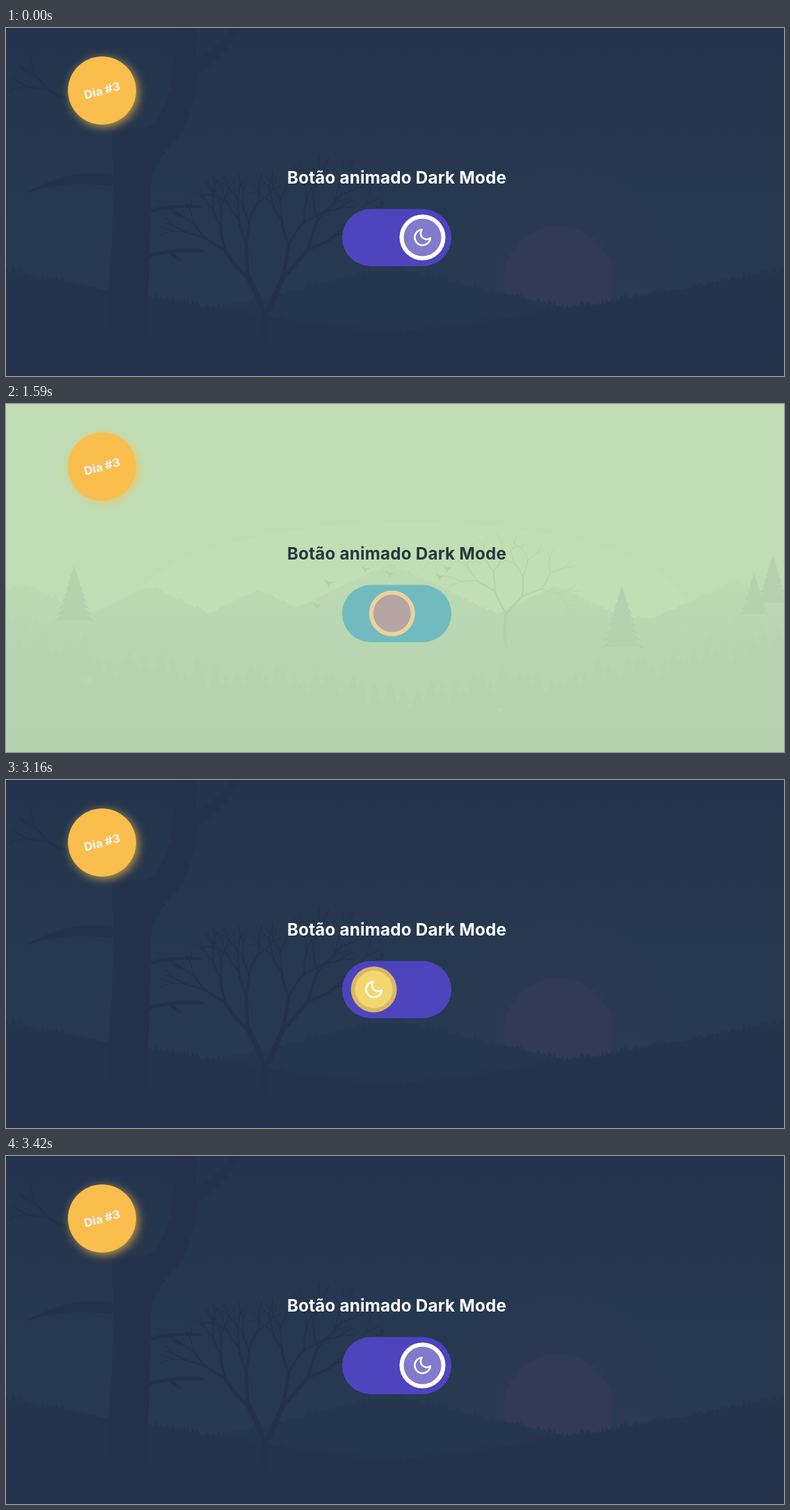
An HTML page that plays this animation: 1118 px wide and 501 px high, repeating every 4830 ms.

```html
<!DOCTYPE html>
<html lang="pt-BR">
<head>
<meta charset="utf-8">
<title>Botão animado Dark Mode</title>
<style>
html, body { margin: 0; width: 100%; height: 100%; overflow: hidden; }
svg { display: block; width: 100%; height: 100%; }
text { font-family: Inter, sans-serif; text-anchor: middle; }
</style>
</head>
<body>
<svg viewBox="0 0 1118 501" preserveAspectRatio="none">
  <defs>
    <linearGradient id="nightSky" x2="0" y2="1">
      <stop offset="0" stop-color="#24344e"/>
      <stop offset=".45" stop-color="#26384f"/>
      <stop offset=".8" stop-color="#273a51"/>
    </linearGradient>
    <linearGradient id="nightGround" x2="0" y2="1">
      <stop offset="0" stop-color="#24354e"/>
      <stop offset="1" stop-color="#24324c"/>
    </linearGradient>
    <radialGradient id="halo">
      <stop offset=".4" stop-color="#333b55" stop-opacity=".35"/>
      <stop offset="1" stop-color="#333b55" stop-opacity="0"/>
    </radialGradient>
    <linearGradient id="haze" x2="0" y2="1">
      <stop offset="0" stop-color="#bcdab3"/>
      <stop offset=".5" stop-color="#b8d6b2"/>
      <stop offset="1" stop-color="#b4d2ae"/>
    </linearGradient>
    <linearGradient id="woods" x2="0" y2="1">
      <stop offset="0" stop-color="#b6d5b0"/>
      <stop offset="1" stop-color="#b4d2ad"/>
    </linearGradient>
    <filter id="blur" x="-50%" y="-50%" width="200%" height="200%">
      <feGaussianBlur stdDeviation="7"/>
    </filter>
  </defs>

  <g id="night">
    <rect width="1118" height="501" fill="url(#nightSky)"/>
    <circle cx="794" cy="364" r="170" fill="url(#halo)"/>
    <circle cx="794" cy="364" r="79" fill="#323a54"/>
    <path id="backRidge" fill="#25364f"/>
    <path id="frontRidge" fill="url(#nightGround)"/>
    <path fill="#24314c" d="M133 501Q160 330 152 150L172 130Q188 152 206 141Q245 110 245 0H275L272 45Q305 28 322 0H338Q312 46 274 66Q270 120 251 155Q209 195 209 225Q206 400 198 501ZM154 211Q90 200 24 240Q80 217 154 228Z"/>
    <g id="branches" fill="none" stroke="#24314c" stroke-linecap="round"></g>
  </g>

  <g id="day">
    <rect width="1118" height="501" fill="#c0dcb4"/>
    <ellipse cx="580" cy="300" rx="400" ry="130" fill="#c2dfb6" opacity=".6"/>
    <path id="peaks" fill="url(#haze)"/>
    <path id="farWoods" fill="#b8d6b1"/>
    <path id="pines" fill="#b4d2ad"/>
    <path id="nearWoods" fill="url(#woods)"/>
    <g id="crown" fill="none" stroke="#b4d2ad" stroke-linecap="round"></g>
    <path id="birds" fill="#b3d1ad"/>
  </g>

  <circle id="glow" cx="141" cy="93" r="49" fill="#f9bd4c" filter="url(#blur)"/>
  <circle cx="138" cy="90" r="49" fill="#f9be4c"/>
  <text transform="translate(138 90) rotate(-15)" y="6" font-size="17" font-weight="800" fill="#f3f0f4">Dia #3</text>
  <text id="title" x="561.5" y="224" font-size="24.2" font-weight="700" letter-spacing=".2">Botão animado Dark Mode</text>

  <rect id="track" x="483" y="260.5" width="157" height="82.5" rx="41.25"/>
  <g id="knob">
    <circle id="rim" r="33"/>
    <circle id="face" r="27"/>
    <path id="moon" transform="scale(1.25) translate(-12 -12)" fill="none" stroke="#fff" stroke-width="2.1" stroke-linejoin="round" d="M21 12.79A9 9 0 1 1 11.21 3 7 7 0 0 0 21 12.79z"/>
  </g>
</svg>
<script>
const W = 1118, H = 501;
const $ = id => document.getElementById(id);
const set = (id, name, value) => $(id).setAttribute(name, value);

let seed = 7;
const rnd = () => (seed = seed * 16807 % 2147483647) / 2147483647;

// Ground below y = f(x), with random spikes along its edge.
function ridge(f, spike, step) {
  let d = `M0 ${H}`;
  for (let x = 0; x < W + step; x += step * (.5 + rnd())) {
    d += `L${x} ${f(x)}L${x + step / 3} ${f(x) - spike * rnd()}`;
  }
  return d + `V${H}Z`;
}

// Zigzag conifer widening downwards.
function pine(x, top, height) {
  const rows = 9;
  let right = '', left = '';
  for (let i = 1; i <= rows; i++) {
    const y = top + height * i / rows, w = height * .36 * i / rows;
    right += `L${x + w} ${y}L${x + w * .65} ${y - 2}`;
    left = `L${x - w * .65} ${y - 2}L${x - w} ${y}` + left;
  }
  return `M${x} ${top}${right}${left}Z`;
}

function forest(f, height) {
  let d = ridge(x => f(x) + height * .6, 8, 10);
  for (let x = 0; x < W; x += 8 + 14 * rnd()) {
    d += pine(x, f(x) - height * .4 * rnd(), height * (.8 + .4 * rnd()));
  }
  return d;
}

// Forking bare branches; spread is the fork angle in radians.
function grow(x, y, angle, length, width, spread, depth) {
  const bend = angle + (rnd() - .5) * .5;
  const cx = x + length / 2 * Math.cos(bend), cy = y + length / 2 * Math.sin(bend);
  const ex = x + length * Math.cos(angle), ey = y + length * Math.sin(angle);
  let out = `<path stroke-width="${width}" d="M${x} ${y}Q${cx} ${cy} ${ex} ${ey}"/>`;
  if (depth) for (const side of [-1, 1]) {
    out += grow(ex, ey, angle + side * spread * (.5 + rnd()), length * (.7 + .2 * rnd()), width * .68, spread, depth - 1);
  }
  return out;
}

const UP = -Math.PI / 2;
const twig = y => `<path stroke-width="5" d="M205 ${y}q34 -10 74 -7m-44 1l14 12"/>`;

set('backRidge', 'd', ridge(x => 346 + .235 * Math.abs(x - 555), 10, 6));
set('frontRidge', 'd', ridge(x => 440 - 90 * Math.abs(x / 555 - 1) ** 1.2, 10, 6));
$('branches').innerHTML = twig(264) + twig(328)
  + grow(365, 500, UP + .08, 85, 11, .34, 6)
  + grow(92, 104, Math.PI + .45, 36, 5, .4, 2);

const summits = [[22, 258], [205, 262], [362, 268], [550, 230], [790, 262], [1045, 254]];
const valley = x => 310 + 70 * Math.sin(Math.PI * x / W);
set('peaks', 'd', ridge(x => Math.min(308, ...summits.map(([px, py]) => py + .48 * Math.abs(x - px))), 4, 12));
set('farWoods', 'd', forest(valley, 50));
set('pines', 'd', pine(98, 233, 80) + pine(885, 262, 90) + pine(1102, 218, 70) + pine(1075, 244, 60));
set('nearWoods', 'd', forest(x => valley(x) + 30, 75));
$('crown').innerHTML = grow(719, 350, UP, 48, 4, .5, 5);
set('birds', 'd', [[457, 252], [510, 232], [545, 239], [617, 243], [627, 231], [440, 285]]
  .map(([x, y]) => `M${x} ${y}l6 4 7 0-5 4-1 4z`).join(''));

const LOOP = 4830, FADE = 300;
const DAY = { from: 1450, begin: 1424, step: 70 };
const NIGHT = { from: 3160, begin: 3110, step: 65 };

// cubic-bezier(.42, 0, .58, 1)
function easeInOut(x) {
  if (x >= 1) return 1;
  let lo = 0, hi = 1;
  for (let i = 0; i < 20; i++) {
    const s = (lo + hi) / 2;
    if (3 * s * (1 - s) * (.42 * (1 - s) + .58 * s) + s ** 3 < x) lo = s; else hi = s;
  }
  return lo * lo * (3 - 2 * lo);
}

// Each switch is shown in five held steps.
function progress(ms, { from, begin, step }) {
  const held = from + step * Math.min(4, Math.floor((ms - from) / step));
  return easeInOut((held - begin) / FADE);
}

const mix = (a, b, k) => `rgb(${a.map((v, i) => Math.round(v + (b[i] - v) * k))})`;

function draw(ms) {
  const day = ms >= DAY.from && ms < NIGHT.from;
  const p = ms < DAY.from ? 1 : progress(ms, day ? DAY : NIGHT);
  const toDark = k => day ? 1 - k : k;

  set('night', 'display', day ? 'none' : 'inline');
  set('day', 'display', day ? 'inline' : 'none');
  set('moon', 'display', day ? 'none' : 'inline');
  set('glow', 'opacity', day ? .65 : .75);
  set('title', 'fill', day ? '#233a3e' : '#fff');
  set('track', 'fill', day ? '#70bbbf' : '#4d44be');
  set('knob', 'transform', `translate(${524.5 + 74 * toDark(p)} 301.5)`);
  set('rim', 'fill', mix([217, 179, 92], [255, 255, 255], toDark(p)));
  set('face', 'fill', mix([243, 216, 112], [131, 122, 204], toDark(p ** 1.5)));
}

function tick(now) {
  draw(now % LOOP);
  requestAnimationFrame(tick);
}
draw(0);
requestAnimationFrame(tick);
</script>
</body>
</html>
```
